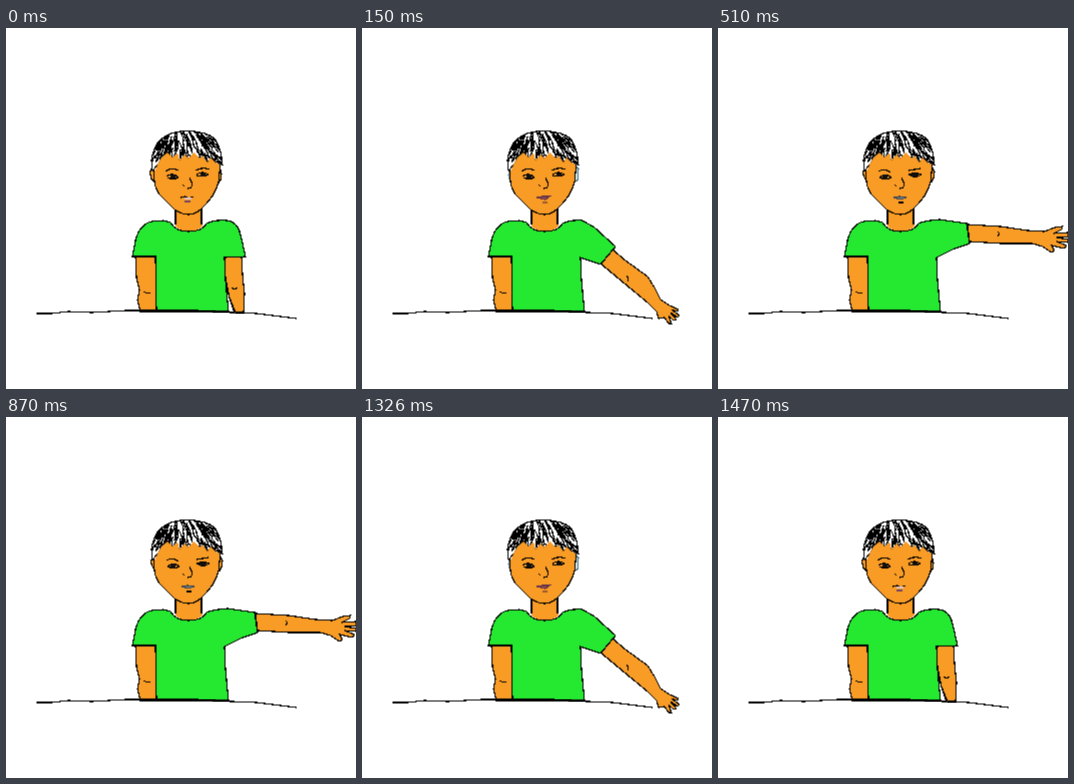
An HTML page for the animation above (1.5 s loop, 350 px wide and 361 px high).

```html
<!DOCTYPE html>
<html lang="en">
<head>
<meta charset="utf-8">
<title>Boy raising his arm</title>
<style>
  html, body { margin: 0; width: 100%; height: 100%; overflow: hidden; background: #fff; }
  svg { display: block; width: 100%; height: 100%; }
  .art { fill: none; stroke: #000; stroke-width: 1.2; shape-rendering: crispEdges; }
  .skin { fill: #f99c26; }
  .shirt { fill: #24e930; }
  .fill { stroke: none; }
  .pose { opacity: 0; }
</style>
</head>
<body>
<svg viewBox="0 0 350 361" preserveAspectRatio="none">
  <defs>
    <path id="hairShape" d="M146 142L145 132Q147 118 153 112Q160 106 168 104Q180 101 194 104Q206 106 210 113Q215 121 216 137L209 134L204 129L201 134L196 127L193 130L187 124L182 130L178 126L173 132L171 124L166 129L161 124L155 129L151 136L149 142Z"/>
    <clipPath id="hairClip"><use href="#hairShape"/></clipPath>
  </defs>
  <g class="art" transform="translate(.5 .5)" id="art"></g>
</svg>
<script>
const LOOP = 1500;
const STEPS = [[0, 'rest'], [150, 'low'], [510, 'high'], [1110, 'low'], [1470, 'rest']];
const art = document.getElementById('art');

const path = (d, cls = '', extra = '') => `<path class="${cls}" d="${d}" ${extra}/>`;

function randomFrom(seed) {
  return () => (seed = (seed * 16807) % 2147483647) / 2147483647;
}

// Strands fan out from the crown and are trimmed by the fringe.
function hair(seed) {
  const rnd = randomFrom(seed);
  let d = '';
  for (let i = 0; i < 250; i++) {
    const x = 144 + 72 * rnd();
    const y = 98 + 38 * rnd();
    const lean = Math.atan2(y - 85, x - 172) + (rnd() - 0.5) * 0.6;
    const size = 7 + 8 * rnd();
    const dx = size * Math.cos(lean), dy = size * Math.sin(lean);
    d += `M${x.toFixed(1)} ${y.toFixed(1)}q${(dx * 0.6).toFixed(1)} ${(dy * 0.4).toFixed(1)} ${dx.toFixed(1)} ${dy.toFixed(1)}`;
  }
  return '<use href="#hairShape" fill="#fff" stroke="none"/>' +
    `<g clip-path="url(#hairClip)">${path(d)}</g>` +
    path('M146 142L145 132Q147 118 153 112Q160 106 168 104Q180 101 194 104Q206 106 210 113Q215 121 216 137');
}

const neck = path('M169 176L169 198Q182 208 196 198L196 177Z', 'skin fill') +
  path('M169 176V196M195 178V196');
const face = path('M148 125Q146 140 148 153Q149 163 156 169L168 181Q175 186 182 186Q190 186 197 178Q208 168 212 154L214 134L211 122L180 112Z', 'skin');
const leftArm = path('M129 228L130 249L133 261L131 272L134 283H150L149 228Z', 'skin') +
  path('M137 263L141 265L144 264');
const table = path('M30 285L45 285L62 283L85 284L120 282L190 282L225 284L250 285L290 290');
const nose = path('M183 149L186 156Q185 160 181 160M176 156L178 158');

const brows = path('M159 143Q165 138 172 142M189 142Q196 138 203 141');
const openEyes = brows +
  path('M160 148Q166 143 172 149Q166 152 161 149M190 146Q196 142 202 146Q196 149 190 147') +
  path('M164 146H169V150H164ZM194 145H199V148H194Z', 'fill', 'fill="#111"');

const shirt = sleeve =>
  path(`M126 228L129 212Q133 196 145 193L157 192L164 194Q169 203 182 203Q196 203 200 195${sleeve}L218 229L219 252L222 283H150L149 228Z`, 'shirt');

const poses = {
  rest: {
    sleeve: 'Q208 191 220 192Q231 193 234 206L239 228',
    arm: path('M218 228H235L236 246L238 265L237 284H229L223 269L219 250Z', 'skin') +
      path('M225 259L228 261L231 259') + path('M220 258L224 273L228 284'),
    ears: path('M147 140Q143 139 144 147Q145 153 149 153', 'skin') +
      path('M213 137L215 145Q215 153 211 155', 'skin') +
      path('M212 142V151', '', 'stroke="#4a8d86"'),
    eyes: openEyes,
    mouth: path('M174 169L179 168L182 170L187 168') +
      path('M178 170H185', '', 'stroke="#dcc3ce"') + path('M178 173H184', '', 'stroke="#71445f"')
  },
  low: {
    sleeve: 'Q208 191 220 192L232 199L253 218L238 236',
    arm: path('M249 220L263 232L285 248L292 259L298 271L307 277L316 281L315 283L309 281L317 287L315 289L308 284L314 291L311 292L306 287L309 295L306 295L302 289L296 290L294 283L285 274L262 255L238 235Z', 'skin') +
      path('M264 247L266 250L265 253'),
    ears: path('M147 140L146 147L148 154', '', 'stroke="#718f99"') +
      path('M213 138L216 140L215 152L212 153', '', 'fill="#d8edf0" stroke="#416f7c"'),
    eyes: openEyes,
    mouth: path('M174 169L180 168L187 168L183 171Z', '', 'fill="#bc4c54" stroke="#613547"') +
      path('M180 174H185', '', 'stroke="#9b5b2c"')
  },
  high: {
    sleeve: 'Q207 192 221 191L248 195L251 215L234 221',
    arm: path('M249 196L282 198L309 202L326 203L336 199L344 198L343 201L335 205L350 204V208L338 209L350 211V214L338 213L348 217L346 220L333 217L336 222L333 224L324 218L314 215L283 215L251 213Z', 'skin') +
      path('M279 203L281 205L279 208'),
    ears: path('M148 140Q144 140 145 147L148 153', 'skin') +
      path('M213 138L216 143Q216 152 211 155', 'skin'),
    eyes: path('M160 143Q166 139 172 144M190 142L202 140') +
      path('M161 149Q167 144 173 149Q167 152 161 149M190 146L196 144L203 146L197 149Z') +
      path('M164 146H169V151H164ZM193 145H200V148H193Z', 'fill', 'fill="#111"'),
    mouth: path('M175 169L181 168L188 169L182 171Z', '', 'fill="#828b91" stroke="#3f4850"') +
      path('M180 174H185')
  }
};

const shared = neck + leftArm;
const hairStrands = hair(4711);

art.innerHTML = Object.entries(poses).map(([name, p]) =>
  `<g class="pose" id="${name}">${shared}${p.arm}${shirt(p.sleeve)}${p.ears}${face}${hairStrands}${p.eyes}${nose}${p.mouth}</g>`
).join('') + table;

// Each pose holds until the next step, then cuts.
for (const name of Object.keys(poses)) {
  const frames = STEPS.map(([time, pose]) => ({
    offset: time / LOOP,
    opacity: pose === name ? 1 : 0,
    easing: 'steps(1, end)'
  }));
  frames.push({ offset: 1, opacity: frames[0].opacity });
  document.getElementById(name).animate(frames, { duration: LOOP, iterations: Infinity });
}
</script>
</body>
</html>
```
